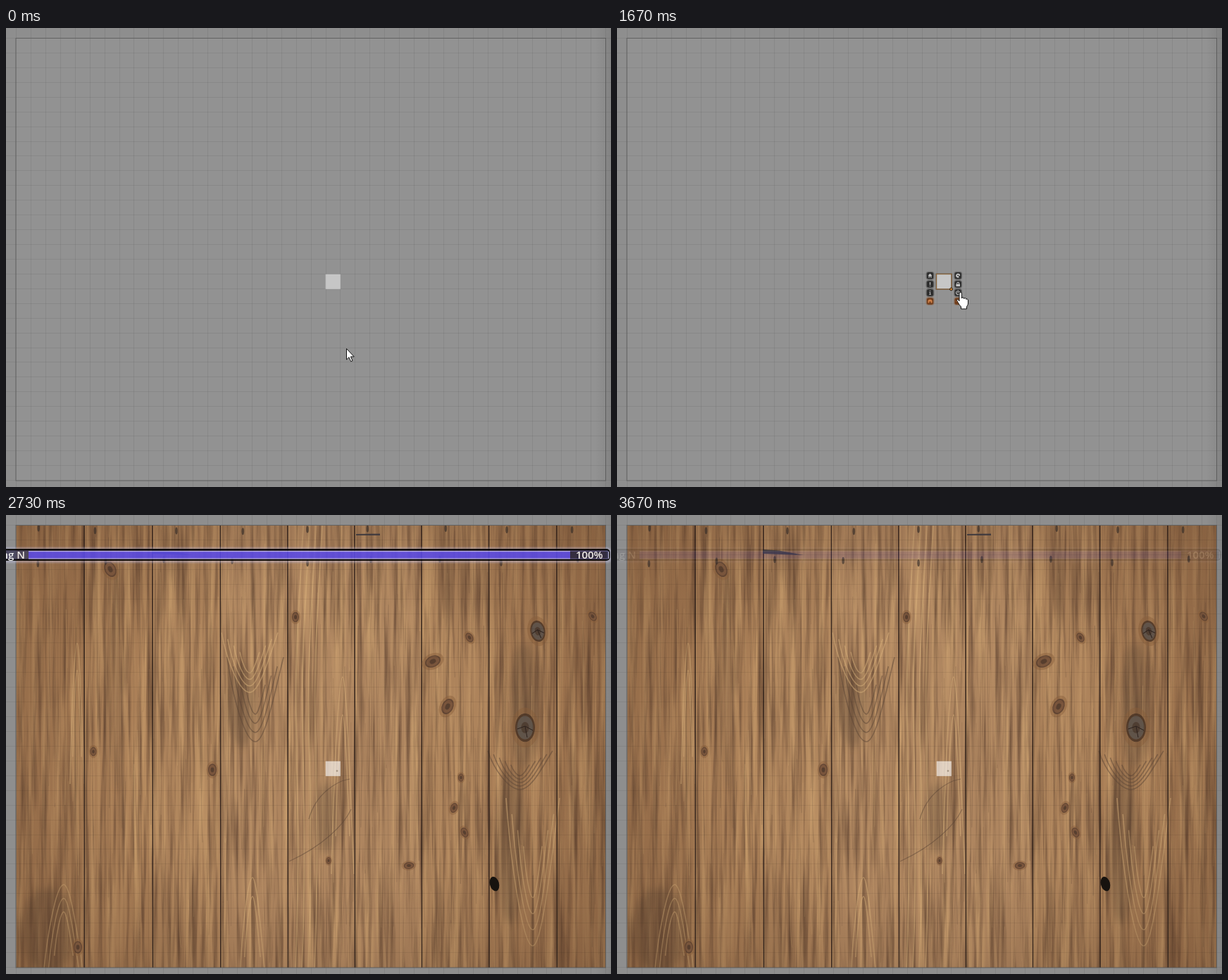
Write an HTML page that moves like this. It is 859 px wide and 652 px high and loops after 3740 ms.

```html
<!DOCTYPE html>
<html lang="en">
<head>
<meta charset="utf-8">
<title>Scene change</title>
<style>
html, body { margin: 0; width: 100%; height: 100%; overflow: hidden; background: #8e8e8e; }
svg { display: block; width: 859px; height: 652px; }
text { font-family: "Open Sans", "Noto Sans", sans-serif; font-weight: 600; }
</style>
</head>
<body>
<svg viewBox="0 0 859 652" xmlns="http://www.w3.org/2000/svg">
  <defs>
    <linearGradient id="edge"><stop offset="0" stop-opacity="0"/><stop offset="1" stop-opacity=".08"/></linearGradient>
    <radialGradient id="vignette" r=".75"><stop offset=".45" stop-color="#3a2012" stop-opacity="0"/><stop offset="1" stop-color="#3a2012" stop-opacity=".32"/></radialGradient>
    <clipPath id="frame"><rect x="14.5" y="15" width="836.5" height="628"/></clipPath>
    <filter id="dark" x="0" y="0" width="1" height="1" color-interpolation-filters="sRGB">
      <feTurbulence type="fractalNoise" baseFrequency=".16 .006" numOctaves="4" seed="8"/>
      <feColorMatrix values="0 0 0 0 .36  0 0 0 0 .25  0 0 0 0 .18  1.6 0 0 0 -.68"/>
    </filter>
    <filter id="light" x="0" y="0" width="1" height="1" color-interpolation-filters="sRGB">
      <feTurbulence type="fractalNoise" baseFrequency=".11 .004" numOctaves="3" seed="21"/>
      <feColorMatrix values="0 0 0 0 .84  0 0 0 0 .67  0 0 0 0 .46  0 1.5 0 0 -.66"/>
    </filter>
    <filter id="soft" x="-1" y="-1" width="3" height="3"><feGaussianBlur stdDeviation="6"/></filter>
    <filter id="glow" x="-.1" y="-1" width="1.2" height="3"><feGaussianBlur stdDeviation="1.5"/></filter>
  </defs>
  <rect width="859" height="652" fill="#8e8e8e"/>
  <g id="board">
    <rect x="14" y="14" width="838" height="629" fill="#929292"/>
    <g id="wood" clip-path="url(#frame)"></g>
    <path id="grid" fill="none" stroke="#000" stroke-opacity=".065"/>
    <rect x="14" y="14.5" width="837.5" height="628.5" fill="none" stroke="#5c5c5c" stroke-opacity=".85"/>
    <rect id="tile" x="453.7" y="349.7" width="21.2" height="21.2" fill="#fff"/>
    <circle id="speck" cx="470" cy="363.5" r="1.3" fill="#a3917e"/>
    <g id="border" fill="none">
      <rect x="453.4" y="349.4" width="21.6" height="21.6" stroke="#3c2a18" stroke-opacity=".6" stroke-width="1.6"/>
      <rect x="453.4" y="349.4" width="21.6" height="21.6" stroke="#a06c34" stroke-width=".7"/>
    </g>
    <circle id="handle" cx="474.5" cy="371" r="1.9" fill="#d98c36" stroke="#2c1c0c"/>
    <g id="hud"></g>
  </g>
  <rect x="836" width="23" height="652" fill="url(#edge)"/>
  <g id="bar">
    <rect x="-20" y="48" width="878" height="18" rx="4" fill="none" stroke="#c9c6ec" stroke-opacity=".75" stroke-width="2.5" filter="url(#glow)"/>
    <rect x="-20" y="49" width="876.5" height="15" rx="4" fill="#29263f" stroke="#000" stroke-width="2"/>
    <rect x="-10" y="51" width="42" height="11" fill="#45425c"/>
    <rect x="32" y="51" width="769" height="11.5" fill="#bdb6fa"/>
    <rect x="32" y="52.2" width="769" height="9.2" fill="#5a4ae8"/>
    <path d="M801 51.5H855V62H801" fill="none" stroke="#6c65a4" stroke-opacity=".7"/>
    <path d="M855.5 52V62" stroke="#c9c5ec"/>
    <g fill="#fff" font-size="15" text-anchor="end">
      <text x="27" y="62">Loading N</text>
      <text x="847.5" y="62">100%</text>
    </g>
  </g>
  <path id="arrow" d="M.5 .5V16L4 12.7L6.7 18.7L9 17.6L6.4 11.9H11.2Z" fill="#fff" stroke="#111" stroke-linejoin="round"/>
  <path id="hand" d="M4 2.5Q4 .5 5.7 .5Q7.4 .5 7.4 2.5V9Q7.6 7.6 9 7.7Q10.6 7.8 10.7 9.6Q11 8.4 12.3 8.6Q13.7 8.8 13.8 10.5Q14.2 9.7 15.2 10Q16.5 10.4 16.5 12V16Q16.5 18.5 14.5 20.8V24H6.5V21Q4 18.5 2.6 15.6L.8 12.6Q.2 11 1.3 10.6Q2.4 10.3 4 12.8Z" fill="#fff" stroke="#111"/>
</svg>
<script>
const LOOP = 3740;
const $ = id => document.getElementById(id);

function add(parent, tag, attrs) {
  const el = document.createElementNS("http://www.w3.org/2000/svg", tag);
  for (const key in attrs) el.setAttribute(key, attrs[key]);
  return parent.appendChild(el);
}

let seed = 7;
const rnd = () => (seed = (seed * 16807) % 2147483647) / 2147483647;
const jit = n => (rnd() - .5) * n;

function drawGrid() {
  let d = "";
  for (let k = 0; k < 41; k++) {
    const p = Math.round(14 + k * 20.93) + .5;
    d += `M${p} 0V652`;
    if (p < 652) d += `M0 ${p}H859`;
  }
  $("grid").setAttribute("d", d);
}

const wood = $("wood"), PALE = "#d9b27c", DEEP = "#5c4636", PLANKS = 9;
const seam = i => 15 + 96 * i + 1.4 * Math.sin((i - 1) * Math.PI / 4);

const line = (d, stroke, width, opacity) =>
  add(wood, "path", { d, fill: "none", stroke, "stroke-width": width, "stroke-opacity": opacity });
const cover = attrs => add(wood, "rect", { x: 14, y: 14, width: 838, height: 630, ...attrs });
const shade = (cx, cy, rx, ry) =>
  add(wood, "ellipse", { cx, cy, rx, ry, fill: DEEP, opacity: .36, filter: "url(#soft)" });

// nested growth rings; a negative height opens upwards
function rings(x, y, w, h, count, color) {
  for (let k = 0; k < count; k++) {
    const s = 1 - k / (count + .6), top = y + (1 - s) * h * .5, a = w * s, b = h * s;
    line(`M${x - a} ${top + b}C${x - a * .8} ${top + b * .5} ${x - a * .35} ${top} ${x} ${top}` +
      `S${x + a * .7} ${top + b * .6} ${x + a} ${top + b}`, color, 1.6, .5);
  }
}

function grain(i) {
  const left = seam(i), width = seam(i + 1) - left;
  for (let n = 0; n < 24; n++) {
    const x = left + rnd() * width, y = rnd() * 400;
    line(`M${x} ${y}C${x + jit(8)} ${y + 120} ${x + jit(8)} ${y + 240} ${x + jit(5)} ${y + 200 + rnd() * 250}`,
      n % 2 ? DEEP : PALE, .5 + rnd() * .7, .14 + rnd() * .14);
  }
}

function knot(x, y, r, tilt) {
  const g = add(wood, "g", { transform: `translate(${x} ${y}) rotate(${tilt})` });
  const big = r > 9, oval = (s, fill, opacity) => add(g, "ellipse", { rx: r * s, ry: r * 1.45 * s, fill, opacity });
  oval(1.4, "#875d3b", .45);
  oval(1, big ? "#4c3526" : "#5b4030", .85);
  oval(.82, big ? "#62564d" : "#7c573d", .9);
  oval(.4, "#493629", .7);
  if (big) add(g, "path", { d: `M${-r * .8} 2L0 -2L${r * .8} 4M0 -2L3 ${r}`, stroke: "#2c211c", fill: "none" });
}

function drawWood() {
  for (let i = 0; i < PLANKS; i++) {
    const tone = 46.5 + 6.5 * Math.sin(Math.PI * (i + 1) / 10);
    add(wood, "rect", { x: seam(i) - 1, y: 14, width: 98, height: 630, fill: `hsl(29 33% ${tone}%)` });
  }
  cover({ filter: "url(#light)" });
  cover({ filter: "url(#dark)" });
  shade(157, 220, 4, 170);
  shade(735, 270, 20, 90);
  shade(716, 470, 20, 110);
  shade(335, 270, 20, 60);
  shade(455, 430, 18, 50);
  shade(60, 590, 40, 60);
  for (let i = 0; i < PLANKS; i++) grain(i);

  rings(101, 182, 10, 200, 2, PALE);
  rings(82, 525, 30, 140, 3, PALE);
  rings(350, 515, 18, 140, 2, PALE);
  rings(354, 322, 40, -120, 4, DEEP);
  rings(346, 252, 40, -85, 4, PALE);
  rings(478, 230, 16, 280, 2, PALE);
  rings(730, 390, 46, -55, 5, DEEP);
  rings(748, 612, 38, -210, 4, PALE);
  for (let x = 414; x < 450; x += 9)
    line(`M${x + 8} 14C${x + 3} 120 ${x - 4} 190 ${x - 2} 300S${x + 3} 500 ${x - 3} 643`, PALE, 2, .5);
  line("M488 375C470 378 440 395 430 432M490 418C480 440 450 470 402 492", DEEP, 1.2, .5);
  cover({ fill: "url(#vignette)" });

  for (let i = 1; i < PLANKS; i++) {
    const x = seam(i);
    line(`M${x + 1.6} 14V643`, PALE, 1, .3);
    line(`M${x} 14C${x + .8} 220 ${x - .8} 430 ${x + .5} 643`, "#30211a", 1.6, .9);
  }
  // x, y, radius, tilt
  [[148, 77, 8, -25], [411, 145, 5, 0], [755, 165, 10.5, -10], [737, 302, 14, 0], [658, 174, 5, -30], [606, 208, 8, 65],
    [627, 272, 8, 25], [646, 373, 4, 0], [636, 416, 5, 20], [651, 451, 5, -25], [833, 144, 5, -35], [124, 336, 4.5, 0],
    [293, 362, 6, 0], [458, 491, 3.5, 0], [572, 498, 5, 85], [102, 614, 6, 0]].forEach(k => knot(...k));
  add(wood, "ellipse", { rx: 6.5, ry: 10.5, fill: "#17130f", transform: "translate(693.5 524) rotate(-15)" });

  // nail marks near the top of each plank
  for (let i = 0; i < PLANKS; i++)
    for (const y of [20, 66])
      add(wood, "ellipse", { cx: seam(i) + 25 + jit(20), cy: y + jit(8), rx: 1.8, ry: 5, fill: "#3b3029", opacity: .7 });
  add(wood, "path", { d: "M207 49L230 50.5L265 57L207 55ZM497 27L531 26.5V29H497Z", fill: "#38363c", opacity: .85 });
}

function drawHud() {
  const glyphs = [
    "M-3 0L0 -3L3 0H2V3H.7V1H-.7V3H-2V0Z",
    "M-.6 -3H.6V1H-.6ZM-.6 2H.6V3H-.6Z",
    "M-.6 -3H.6V-2H-.6ZM-1 -1H.6V2.2H1.2V3H-1.2V2.2H-.4V-.2H-1Z",
    "M-3 2.4V-.5Q-2.6 -2.5 0 -2.5T3 -.5V2.4H1V.5H-1V2.4Z",
    "M0 -3A3 3 0 0 1 3 0L1 .4L1.4 2.6A3 3 0 1 1 0 -3ZM-1 -1V.4H1V-1Z",
    "M-2.8 -.2H-2V-1Q-2 -3.2 0 -3.2T2 -1V-.2H2.8V3H-2.8ZM-1 -.2H1V-1Q1 -2.2 0 -2.2T-1 -1Z",
    "M-.6 -3.4H.6V.4H-.6ZM-1.5 -2.8V-1.5A2.1 2.1 0 1 0 1.5 -1.5V-2.8A3.2 3.2 0 1 1 -1.5 -2.8Z",
    "M-.5 -3H.5V-.5H3V.5H.5V3H-.5V.5H-3V-.5H-.5Z"
  ];
  glyphs.forEach((d, i) => {
    const warm = i % 4 === 3;
    const g = add($("hud"), "g", { transform: `translate(${i < 4 ? 444.5 : 484.2} ${351.8 + (i % 4) * 12.1})` });
    add(g, "rect", { x: -6, y: -6, width: 12, height: 12, rx: 4, fill: warm ? "#8a4a20" : "#333", opacity: .35 });
    add(g, "rect", { x: -4.7, y: -4.7, width: 9.4, height: 9.4, rx: 2.5, fill: warm ? "#6f3d1c" : "#2e2e2e" });
    add(g, "path", { d, fill: warm ? "#d08048" : "#c4c4c4", "fill-rule": "evenodd" });
  });
}

const smooth = p => p * p * (3 - 2 * p);
const speedUp = p => p * p;
const steady = p => p;

// pointer strokes: each bends towards a control point and starts where the last one ended
const START = [483, 455];
const strokes = [
  { from: 0, to: 470, bend: [494, 408], end: [473.7, 357], ease: smooth },
  { from: 1070, to: 1300, bend: [488, 366], end: [503, 386], ease: smooth },
  { from: 1330, to: 1670, bend: [495, 384], end: [487, 375], ease: smooth },
  { from: 1870, to: 2270, bend: [470, 510], end: [391.5, 525], ease: speedUp },
  { from: 2270, to: 2600, bend: [174, 568], end: [-44, 611], ease: steady }
];

function pointer(t) {
  let at = START;
  for (const s of strokes) {
    if (t < s.from) break;
    const p = s.ease(Math.min(1, (t - s.from) / (s.to - s.from))), q = 1 - p;
    at = at.map((v, i) => q * q * v + 2 * p * q * s.bend[i] + p * p * s.end[i]);
  }
  return at;
}

// fifteen pictures a second
function snap(t) {
  const start = k => 10 * Math.round(k * 20 / 3), k = Math.round(t * 3 / 200);
  return Math.min(3670, start(k) > t ? start(k - 1) : start(k));
}

const show = (id, on) => $(id).style.display = on ? "" : "none";

function render(time) {
  const t = snap(time % LOOP), [x, y] = pointer(t);
  const wooden = t >= 2330, hand = t >= 1530 && t < 1930;
  show("board", t < 2070 || wooden);
  show("wood", wooden);
  show("speck", wooden);
  $("tile").setAttribute("fill-opacity", wooden ? .6 : .48);
  show("border", t >= 400 && !wooden);
  show("handle", t >= 800 && !wooden);
  show("hud", t >= 1000 && !wooden);
  show("bar", t >= 2070);
  const fade = Math.max(0, (t - 2330) / 1700);
  $("bar").setAttribute("opacity", .5 + Math.cos(fade * Math.PI) / 2);
  show("arrow", !hand);
  show("hand", hand);
  $("arrow").setAttribute("transform", `translate(${x} ${y})`);
  $("hand").setAttribute("transform", `translate(${x - 5} ${y})`);
}

drawGrid();
drawWood();
drawHud();
const begin = performance.now();
function tick() {
  render(performance.now() - begin);
  requestAnimationFrame(tick);
}
tick();
</script>
</body>
</html>
```
